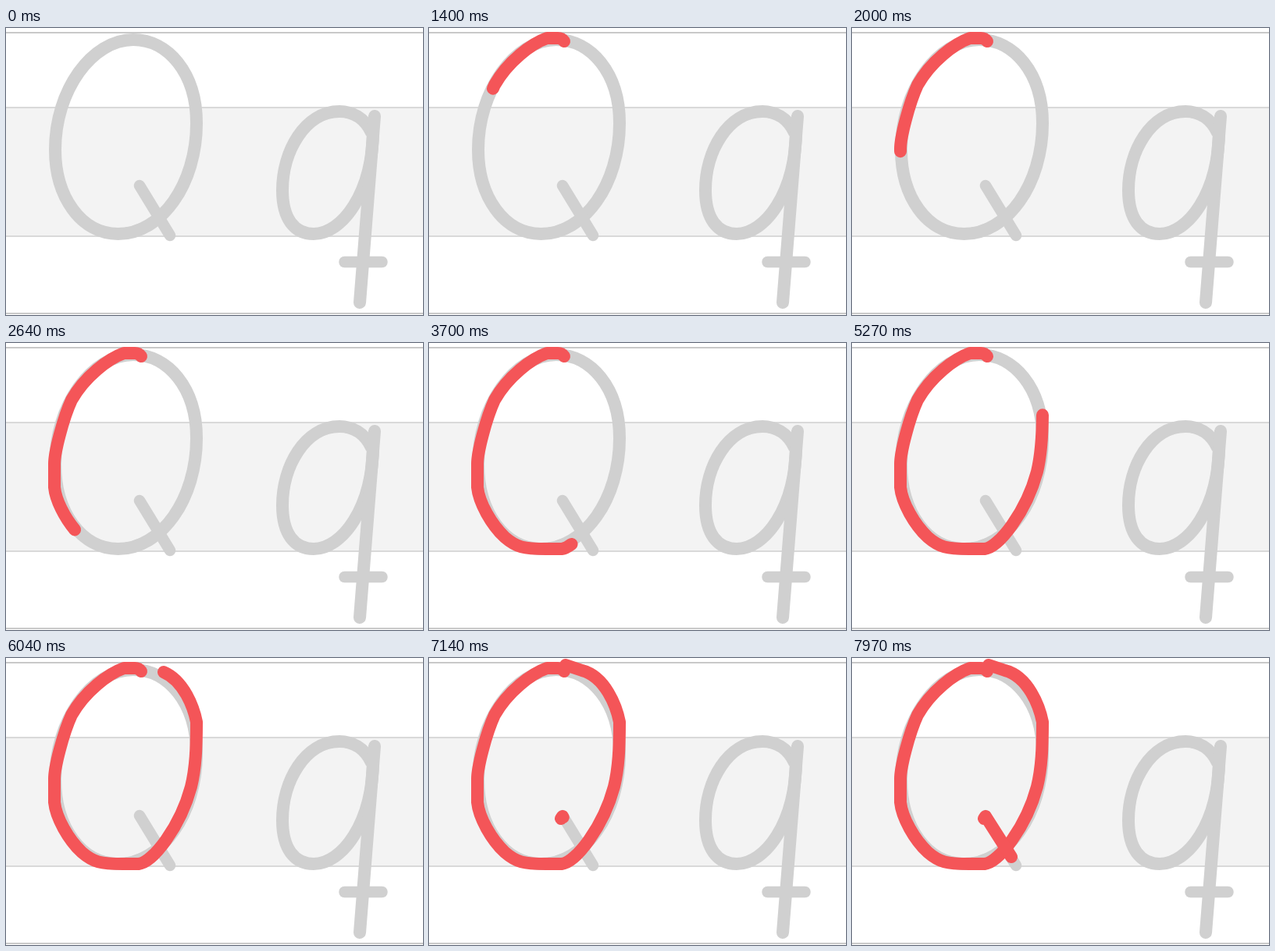
An HTML page for the animation above (8000 ms loop, 534x368 px).

```html
<!DOCTYPE html>
<html lang="en">
<head>
<meta charset="utf-8">
<title>Writing the letter Q</title>
<style>
  html, body { margin: 0; width: 100%; height: 100%; overflow: hidden; background: #fff; }
  svg { display: block; }
  path { fill: none; stroke-width: 16; stroke-linecap: round; stroke-linejoin: round; }
  .guide { stroke: #d0d0d0; }
  .thin { stroke-width: 14.5; }
  .line { stroke-width: 2; }
  .outer { stroke: #c9c9c9; }
  .inner { stroke: #d9d9d9; }

  /* The pen advances about thirty times a second; the small delay absorbs rounding. */
  .ink { stroke: #f45558; animation: 8s -4ms infinite; }
  .bowl { stroke-dasharray: 700; animation-name: bowl; }
  .tail { stroke-dasharray: 66; animation-name: tail; }

  @keyframes bowl {
    0%     { opacity: 0; stroke-dashoffset: 699.9; animation-timing-function: step-end; }
    0.75%  { opacity: 1; }
    4.125% { stroke-dashoffset: 699.9; animation-timing-function: steps(32); }
    17.5%  { stroke-dashoffset: 580; animation-timing-function: steps(37); }
    33%    { stroke-dashoffset: 409; animation-timing-function: steps(32); }
    46.25% { stroke-dashoffset: 305; animation-timing-function: steps(78); }
    78.75% { stroke-dashoffset: 2; }
    100%   { opacity: 1; stroke-dashoffset: 2; }
  }
  @keyframes tail {
    0%      { opacity: 0; stroke-dashoffset: 65.9; animation-timing-function: step-end; }
    82.5%   { opacity: 1; }
    88.375% { stroke-dashoffset: 65.9; animation-timing-function: steps(27); }
    99.625% { stroke-dashoffset: 0; }
    100%    { opacity: 1; stroke-dashoffset: 0; }
  }
</style>
</head>
<body>
<svg width="534" height="368" viewBox="0 0 534 368">
  <rect y="102" width="534" height="165" fill="#f3f3f3"/>
  <path class="line outer" d="M0 6H534M0 366H534"/>
  <path class="line inner" d="M0 102H534M0 267H534"/>

  <!-- Q -->
  <path class="guide" d="M163 15C207 15 244 57 244 122C244 200 199 264 143.500 264C96 264 63 216 63 156C63 80 110 15 163 15Z"/>
  <path class="guide thin" d="M171 202L210 266"/>

  <!-- q -->
  <path class="guide" d="M468 134C459 115 443 107 427 107C383 107 354 158 354 208C354 244 369 264 394 264C430 264 470 212 470 130"/>
  <path class="guide" d="M472 113L453 352"/>
  <path class="guide thin" d="M433.500 300H481.500"/>

  <path class="ink bowl" d="M173 17Q170 13 165 13H151C131 20 101 43 84 73C73 97 62 140 62 155V185C64 205 80 233 97 249C112 262 121 264 150 264H170C188 262 223 217 237 165C243 140 244 115 244 82C240 62 226 24 196 16L175 9"/>
  <path class="ink tail" d="M169 206L171 203L204 255"/>
</svg>
</body>
</html>
```
